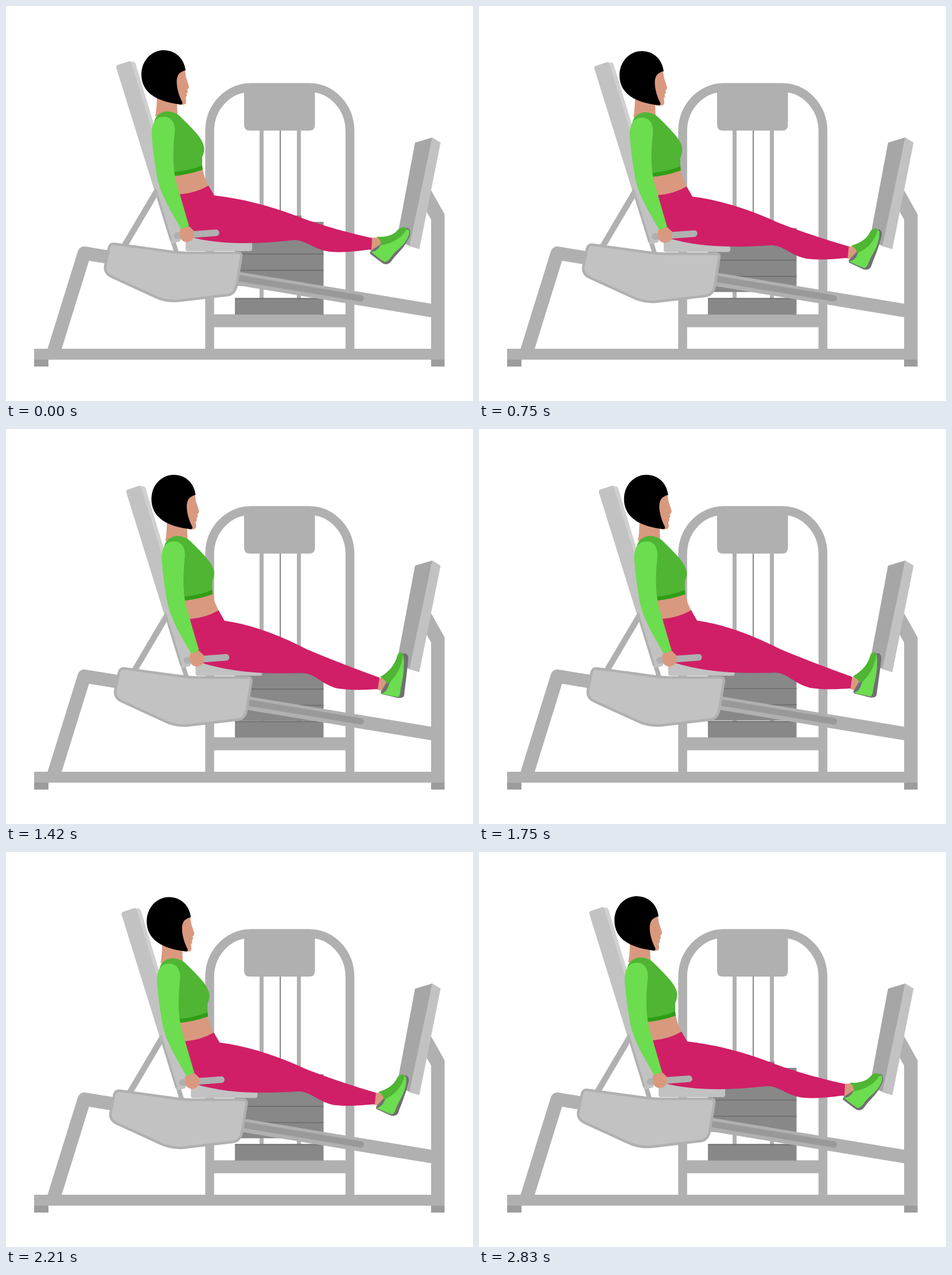
Animation of 814 by 688 pixels, one loop 2880 ms. Source, as an HTML page:

```html
<!DOCTYPE html>
<html lang="en">
<head>
<meta charset="utf-8">
<title>Leg press</title>
<style>
  html, body { margin: 0; width: 100%; height: 100%; overflow: hidden; background: #fff; }
  svg { display: block; width: 100vw; height: 100vh; }
  .frame { fill: #b0b0b0; }
  .tube { fill: none; stroke: #b0b0b0; }
  .pad { fill: #c2c2c2; }
  .weight { fill: #888; }
  .groove { fill: #6f6f6f; }
  .foot { fill: #9c9c9c; }
  .skin { fill: #d9997f; }
  .top { fill: #4fb533; }
  .band { fill: #2f9e16; }
  .light { fill: #6bdd4f; }
  .pants { fill: #d01f66; }
</style>
</head>
<body>
<svg viewBox="0 0 814 688">
  <!-- weight tower -->
  <path class="tube" stroke-width="15.5" d="M355 600V218C355 175 388 142 427 142H528C567 142 599.5 175 599.5 218V600"/>
  <path class="frame" d="M415 146H538.5V207Q538.5 217 528.5 217H425Q415 217 415 207Z"/>
  <path class="tube" stroke-width="7" d="M445.5 215V510M510.5 215V510"/>
  <path d="M478 217V385" stroke="#6f6f6f" stroke-width="1.7"/>
  <rect class="frame" x="355" y="537" width="245" height="22.5"/>
  <g id="stack">
    <rect class="weight" x="503" y="365" width="12" height="12"/>
    <rect class="weight" x="399" y="376" width="154.5" height="111.5"/>
    <path d="M399 403.5H553.5M399 432H553.5M399 460.3H553.5" stroke="#6f6f6f" stroke-width="1.8"/>
  </g>
  <rect class="weight" x="399" y="509" width="154.5" height="28.5"/>
  <rect class="groove" x="399" y="508.5" width="154.5" height="2"/>

  <!-- machine frame -->
  <path class="tube" stroke-width="23.5" stroke-linejoin="round" d="M82 606L136.5 430.5L745 531"/>
  <path d="M400 473L618.5 509.2" stroke="#999" stroke-width="11" stroke-linecap="round"/>
  <rect class="frame" x="49" y="597" width="715" height="19"/>
  <rect class="foot" x="49" y="616" width="25" height="12"/>
  <rect class="foot" x="741" y="616" width="23.5" height="12"/>
  <path class="frame" d="M741 321L764.5 363V616H741V372L732 356Z"/>
  <path fill="#a6a6a6" d="M713 238L743 229L706 419L681 408Z"/>
  <path class="pad" d="M743 229L757.5 238L720.5 423.5L703 418.5Z"/>

  <!-- sliding seat -->
  <g class="carriage">
    <path class="tube" stroke-width="10.5" d="M266 317L204.5 421"/>
    <path class="tube" stroke-width="8" d="M279 370L298 432"/>
    <path fill="#d0d0d0" d="M215 97L223 97Q225 98 226 101L312 385H290Z"/>
    <path class="pad" d="M194 103L215 96Q217 96 218 98L310 396L303 410L290 413.5Q287 413 286 409L192 107Q192 104 194 103Z"/>
    <path class="tube" stroke-width="3.5" d="M260 318L288 409"/>
    <rect class="pad" x="313" y="404" width="116" height="23" rx="4"/>
    <path class="pad" stroke="#b0b0b0" stroke-width="4.5" d="M190 414.5L285 427.5Q300 430 315 430H405Q411 430 410 437L402 486Q399 502 386 503.5L300 513.5Q284 515 266 509L184 471.5Q171 465 173 453L179.500 421Q182 413 190 414.5Z"/>
  </g>

  <!-- foot: each path is drawn between its bent and its lowered pose -->
  <path class="skin" d="M632 404L651 403L655 413L650 425L634 425Z"
    data-low="M646 433L656 434L668 446L660 459L646 453Z"/>
  <path fill="#707070" d="M636 426L634 431Q648 442 658 449Q666 452 672 444C682 430 692 424 700 408Q706 398 704 391Q702 386 698 387Z"
    data-low="M653 459L655 462Q670 465 683 468.5Q693 469 694 464C696 445 699 425 701 402Q702 393 697 391Q694 390 691 392Z"/>
  <path class="light" d="M636 428Q648 428 654 414Q680 412 697 390Q703 387 703 394C701 410 688 420 679 428C670 437 668 445 660 446Q650 440 636 428Z"
    data-low="M653 461Q664 460 668 443Q683 424 686 394Q692 388 693 396C695 415 692 432 690 442C687 455 688 463 684 467Q668 464 653 461Z"/>
  <path class="top" d="M646 402Q672 403 682 391Q688 384 697 386L697 391C690 402 678 412 653 417Q655 408 646 402Z"
    data-low="M652 432Q676 418 682 395Q683 389 690 389L692 392C691 410 682 432 664 444Q662 438 652 432Z"/>

  <g class="carriage">
    <path class="skin" d="M263 155L298 165L299 192H260Q263 180 263 155Z"/>
    <path class="skin" d="M300 112H312L313.5 123L319 140Q319 144 316 145.5L317 150L314.5 152.5L315.5 156L313 160Q315 167 313 170Q310 173 302 172L290 150Z"/>
    <path d="M313 112C310.5 91 295 77 275 77C253 77 236 96 236 119C236 148 258 166 303 171.5Q309 172 307 167C299 152 292 124 304 116Q308 113 313 112Z"/>
    <path class="skin" d="M285 290L343 284Q345 300 355 316L303 332Z"/>
    <path class="top" d="M258 203Q261 186 280 183.5Q293 184 301 190Q318 206 330 219.5Q345 236 345.5 249Q345 257 342 263V280L291 293V215Z"/>
    <path class="band" d="M290 289.5Q320 287 342 277.5L343 285Q318 294 290 296.5Z"/>
  </g>

  <path class="pants" d="M303 328Q330 326 353 313L363 330C410 335 465 349 515 369C550 382 600 396 638 404L637 424C610 427 590 430 565 428C535 424 522 406 500 408C440 414.5 375 417 320 402Z"
    data-low="M320.5 331Q347.5 329 370.5 316L381 334C425 340 475 358 525 384C565 401 610 418 651 433L648 453C620 455 600 455 578 452C548 444 540 426 516 425C460 426 400 427 334 405Z"/>

  <g class="carriage">
    <path class="light" d="M254 225C253 200 264 193 275 193C290 193 296 206 294 222C290 260 291 292 300 318L319 383L306 390C290 360 268 330 262 290Q256 255 254 225Z"/>
    <path class="tube" stroke-width="11.5" stroke-linecap="round" d="M298 400L366 395"/>
    <path class="skin" d="M303 389L319 383.5L327 391Q329 397 326 405Q323 411 313 411Q304 409 303 400Z"/>
  </g>
</svg>
<script>
const LOOP = 2880, HALF = LOOP / 2, FIRST = 130, STEP = 540 / 13;
const NUMBER = /[\d.]+/g;

const stack = document.getElementById("stack");
const carriage = document.querySelectorAll(".carriage");
const limbs = [...document.querySelectorAll("[data-low]")].map(path => ({
  path,
  bent: path.getAttribute("d"),
  low: path.dataset.low.match(NUMBER)
}));

// Ease along a bezier whose handles are (x1, 0) and (x2, 1).
function ease(p, x1, x2) {
  let low = 0, high = 1;
  for (let i = 0; i < 24; i++) {
    const s = (low + high) / 2, r = 1 - s;
    const x = 3 * s * r * r * x1 + 3 * s * s * r * x2 + s * s * s;
    if (x < p) low = s; else high = s;
  }
  return low * low * (3 - 2 * low);
}

function amountAt(time) {
  if (time < FIRST) return 0;
  const held = FIRST + STEP * Math.floor((time - FIRST) / STEP + 0.2);
  return held < HALF
    ? ease(held / HALF, 0.54, 0.51)
    : 1 - ease((held - HALF) / HALF, 0.685, 0.43);
}

function mixPath(bent, low, k) {
  let i = 0;
  return bent.replace(NUMBER, n => +n + (low[i++] - n) * k);
}

function draw(time) {
  const k = amountAt(time % LOOP);
  for (const part of carriage) part.setAttribute("transform", `translate(${17.5 * k} ${2.8 * k})`);
  stack.setAttribute("transform", `translate(0 ${21 * k})`);
  for (const { path, bent, low } of limbs) path.setAttribute("d", mixPath(bent, low, k));
}

let start;
function tick(now) {
  start ??= now;
  draw(now - start);
  requestAnimationFrame(tick);
}
draw(0);
requestAnimationFrame(tick);
</script>
</body>
</html>
```
